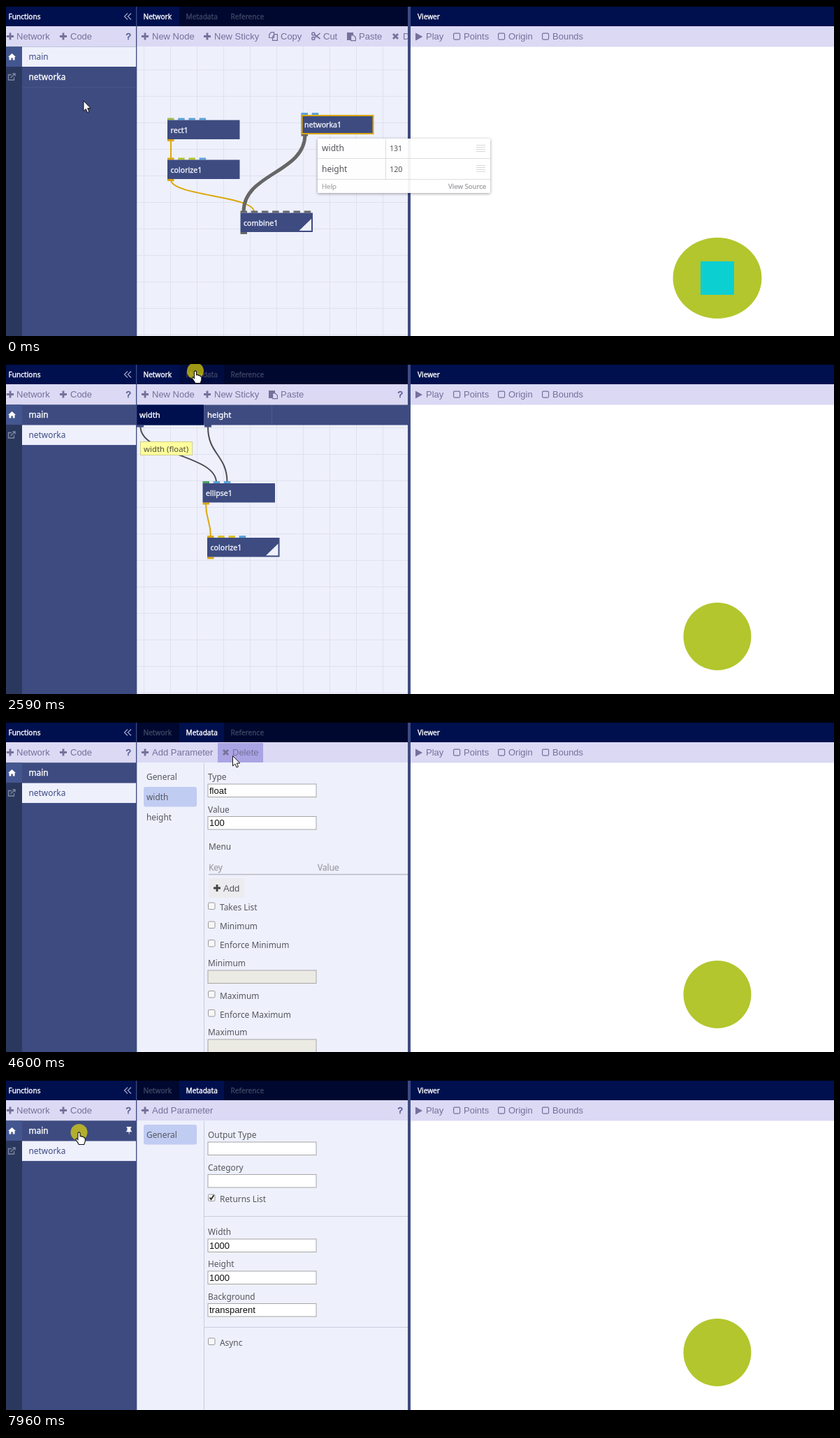
Animation, 1185 px wide and 473 px high, one loop 8 s. Source, as an HTML page:

```html
<!DOCTYPE html>
<html lang="en">
<head>
<meta charset="utf-8">
<title>Node editor</title>
<style>
html, body { margin: 0; width: 100%; height: 100%; overflow: hidden; background: #fff; }
svg { display: block; width: 1185px; height: 473px; }
text { font: 11.9px "Noto Sans", "Open Sans", sans-serif; fill: currentColor; white-space: pre; }
.m { stroke: currentColor; stroke-width: .35px; }
.a { font-family: "Liberation Sans", Arial, sans-serif; font-size: 13px; }
.off { display: none; }
</style>
</head>
<body>
<svg id="stage" viewBox="0 0 1185 473"></svg>
<script>
const NAVY = '#00104e', BLUE = '#3d4b80', INK = '#55565c', TOOL = '#74719a', PALE = '#eef0fc';
const ORANGE = '#dca70c', LIME = '#b7c52c', SKY = '#5ca3d8', GRAY = '#666';

// Drawing helpers
const rect = (x, y, w, h, fill, extra = '') =>
  `<rect x="${x}" y="${y}" width="${w}" height="${h}" fill="${fill}" ${extra}/>`;
const text = (x, y, s, color, cls = '', size = '') =>
  `<text x="${x}" y="${y}" class="${cls}" style="color:${color}${size && `;font-size:${size}px`}">${s}</text>`;
const path = (d, fill, stroke = 'none', w = 1, extra = '') =>
  `<path d="${d}" fill="${fill}" stroke="${stroke}" stroke-width="${w}" ${extra}/>`;
const at = (x, y, s) => `<g transform="translate(${x} ${y})">${s}</g>`;
// Content shown only while the pointer is inside the box
const zone = (x, y, w, h, hand, inner = '') =>
  `<g class="zone off" data-box="${x},${y},${w},${h}" data-hand="${hand}">${inner}</g>`;
const late = (time, inner) => `<g class="late off" data-from="${time}">${inner}</g>`;

const icons = {
  plus: c => path('M0 5H10M5 0V10', 'none', c, 2.8),
  cross: c => path('M1 1.5L8 8.5M8 1.5L1 8.5', 'none', c, 2.8),
  copy: c => path('M.6 4L3.6 .6H7.5V8.5H.6ZM5.5 7L8.5 3.6H12.4V12.4H5.5Z', '#dbd9f4', c, 1.2),
  cut: c => path('M4.5 4L12.5 10M4.5 8.5L12.5 2', 'none', c, 1.6) +
    `<g fill="none" stroke="${c}" stroke-width="1.5"><circle cx="2.8" cy="3" r="2"/><circle cx="2.8" cy="9.4" r="2"/></g>`,
  paste: c => rect(0, 1, 9, 11, c) + path('M5.6 5H9.5L12.4 8V12.6H5.6Z', '#dbd9f4', c, 1.2),
  play: c => path('M0 0L10 5.5L0 11Z', c),
  box: c => rect(.6, .6, 9, 9, 'none', `rx="1.5" stroke="${c}" stroke-width="1.2"`),
  pin: c => path('M1 0H8V1.3H7V5L9 7.3H5.2L4.6 12L4 7.3H0L2 5V1.3H1Z', c)
};
const tool = (x, icon, label, gap = 15) =>
  at(x, icon === 'cut' || icon === 'copy' || icon === 'paste' ? 37 : 38.5, icons[icon](TOOL)) +
  text(x + gap, 48, label, TOOL, 'a');
const help = x => text(x, 48, '?', '#566092', 'a', 13).replace('class="a"', 'class="a" font-weight="700" stroke="#566092" stroke-width=".6"');
const hot = (x, w) => zone(x, 30, w, 28, 0, rect(x, 30, w, 28, '#aaa4e4'));

function ports(x, y, colors) {
  return colors.map((c, i) => rect(x + i * 15.2, y - 3, 9.5, 3, c)).join('');
}
function node(x, y, name, inputs, out, { selected, output } = {}) {
  let s = ports(x, y, inputs) + rect(x, y + 27.5, 9.5, 3, out) + rect(x, y, 103.5, 27.5, BLUE);
  if (selected) s += rect(x + 1, y + 1, 102, 26, 'none', `stroke="${ORANGE}" stroke-width="2"`);
  if (output) s += path(`M${x + 84} ${y + 25.5}H${x + 101.5}V${y + 8.5}Z`, PALE);
  return s + text(x + 4.5, y + 18, name, '#f1f2fa', 'm', 10.6);
}
function wire(x1, y1, x2, y2, color, w = 2) {
  const mid = (y1 + y2) / 2;
  return path(`M${x1} ${y1}C${x1} ${mid} ${x2} ${mid} ${x2} ${y2}`, 'none', color, w);
}
function grid() {
  let d = '';
  for (let x = 197.5; x < 575; x += 38) d += `M${x} 58V473`;
  for (let y = 91.5; y < 473; y += 38) d += `M187 ${y}H575`;
  return rect(187, 58, 388, 415, PALE) + path(d, 'none', '#dfe3ee');
}

// Panels
function tabs(active) {
  const list = [['Network', 187, 61], ['Metadata', 248, 64], ['Reference', 312, 80]];
  return rect(187, 1, 388, 28, '#000830') + list.map(([name, x, w]) => {
    const on = name === active;
    return (on ? rect(x, 1, w, 28, NAVY) : zone(x, 1, w, 28, 1, rect(x, 1, w, 28, '#000c40'))) +
      text(x + 9.5, 18.5, name, on ? '#fff' : '#3f4562', 'm', 10.1);
  }).join('');
}
function rows(active) {
  return ['main', 'networka'].map((name, i) => {
    const y = 58.5 + i * 29, on = name === active;
    return rect(23, y, 163, 28.5, on ? PALE : BLUE) +
      text(32.5, y + 18.5, name, on ? BLUE : '#fff', on ? '' : 'm') +
      zone(23, y, 163, 29, 1, at(171.5, y + 8.5, icons.pin(on ? '#f7f8fe' : '#fff')));
  }).join('') + path('M23 116.5H186', 'none', '#465489');
}
const disc = '<circle cx="1018" cy="390.5" r="48.5" fill="#b3c62d"/>';

function popup() {
  const burger = y => path(`M673 ${y}h13m-13 3h13m-13 3h13m-13 3h13`, 'none', '#d8d8d8');
  return rect(446, 190, 247, 78, '#fff', 'opacity=".94" filter="url(#shadow)"') +
    path('M446 218.5H693M446 248.5H693M543.5 190V248', 'none', '#ddd') +
    text(452, 208, 'width', INK, '', 12.1) + text(549, 208, '131', INK, '', 10.6) +
    text(452, 237.5, 'height', INK, '', 12) + text(549, 237.5, '120', INK, '', 10.8) +
    burger(199.5) + burger(228.5) +
    text(452, 262, 'Help', '#b0b0b4', 'm', 9.6) + text(633, 262, 'View Source', '#a5a5aa', 'm', 9.6);
}
function mainView() {
  return rows('main') + tabs('Network') + grid() + hot(187, 89) +
    tool(194, 'plus', 'New Node') + tool(283, 'plus', 'New Sticky') + tool(376, 'copy', 'Copy', 17) +
    tool(437, 'cut', 'Cut', 17) + tool(488, 'paste', 'Paste', 17) + tool(553, 'cross', 'D') +
    wire(236, 193, 236, 219, ORANGE) + wire(236, 249, 355, 295, ORANGE) +
    wire(428, 184, 340, 295, GRAY, 5) +
    node(231, 163.5, 'rect1', ['#9dbb45', SKY, SKY, SKY], ORANGE) +
    node(231, 220.5, 'colorize1', [ORANGE, LIME, LIME, SKY], ORANGE) +
    node(335.5, 296.5, 'combine1', Array(7).fill(GRAY), GRAY, { output: true }) +
    node(422.5, 156, 'networka1', [SKY, SKY], GRAY, { selected: true }) +
    rect(575, 29, 4, 444, BLUE) + rect(579, 29, 8, 29, '#dbd9f4') + tool(586, 'play', '') +
    `<ellipse cx="1018" cy="390" rx="63.5" ry="58" fill="#b3c62d"/>` +
    rect(994, 366, 48, 48, '#0ccfd2') + popup();
}
function networkView() {
  return rows('networka') + tabs('Network') + grid() + hot(187, 89) +
    tool(194, 'plus', 'New Node') + tool(283, 'plus', 'New Sticky') +
    tool(376, 'paste', 'Paste', 17) + help(560.5) +
    rect(187, 58.5, 388, 29, BLUE) + path('M283.5 59V87M380.5 59V87', 'none', '#4b598e') +
    late(1720, rect(187, 58.5, 96, 29, NAVY)) + zone(187, 59, 194, 28, 1) +
    text(191, 76.5, 'width', '#fff', 'm', 11.3) + text(288, 76.5, 'height', '#fff', 'm', 11.3) +
    rect(187, 87, 10, 3.5, BLUE) + rect(284, 87, 10, 3.5, BLUE) +
    wire(192.5, 90, 301, 170, '#4d4d54') + wire(289, 90, 316.5, 170, '#4d4d54') +
    wire(286, 200, 293, 248, ORANGE) +
    node(281.5, 171, 'ellipse1', ['#4a9f60', SKY, SKY], ORANGE) +
    node(288, 249, 'colorize1', [ORANGE, '#d9c02a', '#d9c02a', SKY], ORANGE, { output: true }) +
    late(1800, rect(192.5, 111.5, 74, 19, '#ffff9c', 'stroke="#cfcf90"') +
      text(197, 125.5, 'width (float)', '#4c4c3c', '', 11.4)) + disc;
}

const input = (y, value = '', fill = '#fff') =>
  rect(289, y + .5, 155, 18.5, fill, 'stroke="#a6a6a6"') + text(291, y + 14, value, '#111', 'a');
const field = (y, label, value, fill) =>
  text(289, y + 4, label, INK) + input(y + 9.5, value, fill);
const check = (y, label, on) =>
  rect(289.5, y - 6.5, 9.5, 9.5, '#f8f8f8', 'rx="1.5" stroke="#999"') +
  (on ? path(`M291.5 ${y - 2}l2 2.5l4-6`, 'none', '#333', 2) : '') + text(306, y + 4.5, label, INK);

function metaFrame(items, chosen) {
  return rows('networka') + tabs('Metadata') + rect(187, 58, 388, 415, PALE) + hot(187, 116) +
    tool(194, 'plus', 'Add Parameter') + path('M283.5 59V473', 'none', '#c9cddc') +
    items.map((name, i) => {
      const y = 64 + i * 29;
      return (name === chosen ? rect(197, y, 76, 28.5, '#c1ccf3', 'rx="3"') : '') +
        zone(197, y, 76, 29, 1) + text(201, y + 18.5, name, INK);
    }).join('') + disc;
}
const general = params => metaFrame(['General', ...params], 'General') + help(560.5) +
  field(79, 'Output Type') + field(125.5, 'Category') + check(170.5, 'Returns List', true) +
  field(218, 'Width', '1000') + field(264, 'Height', '1000') + field(310.5, 'Background', 'transparent') +
  path('M284 195.5H575M284 354.5H575', 'none', '#c9cddc') + check(376.5, 'Async');

function param(params, chosen) {
  const flat = '#ebebe4';
  return metaFrame(['General', ...params], chosen) + hot(303, 65) + tool(310, 'cross', 'Delete', 14) +
    field(79, 'Type', 'float') + field(125.5, 'Value', '100') + text(290, 183, 'Menu', INK) +
    text(290, 212.5, 'Key', '#a2a3aa', 'm') + text(446, 212.5, 'Value', '#a2a3aa', 'm') +
    path('M290 218.5H575', 'none', '#b9bac2', 1.3) + rect(290, 224, 51, 28, '#ececef') +
    at(297, 233, icons.plus('#444')) + text(311, 243, 'Add', INK, 'a') +
    check(265.5, 'Takes List') + check(292.5, 'Minimum') + check(319, 'Enforce Minimum') +
    field(346, 'Minimum', '', flat) + check(392, 'Maximum') + check(419, 'Enforce Maximum') +
    field(445, 'Maximum', '', flat);
}

function chrome() {
  return rect(0, 0, 1185, 473, '#fff') + rect(0, 0, 1185, 29, NAVY) + rect(0, 29, 1185, 29.5, '#dbd9f4') +
    rect(0, 58.5, 187, 415, BLUE) + rect(0, 58.5, 23, 415, '#2b385d') + rect(0, 58.5, 23, 28.5, '#435690') +
    path('M3 73L8.5 68L14 73H12.5V77.5H9.8V74.5H7.3V77.5H4.5V73Z', '#fff') +
    path('M8 98.5H3.5V106H11.5V102M6.5 103L13 97M9.5 97H13V100.5', 'none', '#8189a3', 1.3) +
    text(3.5, 18.5, 'Functions', '#fff', 'm', 10.1) + text(589, 18.5, 'Viewer', '#fff', 'm', 10.1) +
    path('M174 10.5L169.5 15L174 19.5M179 10.5L174.5 15L179 19.5', 'none', '#98a1c8', 1.3) +
    tool(1, 'plus', 'Network', 14) + tool(77, 'plus', 'Code') + help(171.5) +
    tool(586, 'play', 'Play') + tool(640, 'box', 'Points') + tool(704, 'box', 'Origin') + tool(767, 'box', 'Bounds');
}
const frameLines = rect(0, 0, 1185, 1, '#000') + rect(186, 1, 1.3, 472, BLUE);

// Timeline, ms
const LOOP = 8000;
const scenes = [
  [0, mainView()], [950, networkView()], [2740, general(['width', 'height'])],
  [3820, param(['width', 'height'], 'width')], [4910, general(['height'])],
  [5930, param(['height'], 'height')], [6930, general([])]
];
// start, end, steps, way points
const moves = [
  [70, 320, 4, [[111, 136], [96, 106]]],
  [1270, 2030, 11, [[96, 106], [125, 135], [215, 74], [245, 50]]],
  [2110, 2340, 4, [[245, 50], [271, 10]]],
  [2970, 3590, 9, [[271, 10], [224, 104]]],
  [4130, 4600, 7, [[224, 104], [324.5, 48.5]]],
  [5160, 5620, 7, [[324.5, 48.5], [246, 97], [243, 106]]],
  [6240, 6620, 6, [[243, 106], [324.5, 48.5]]],
  [7250, 7700, 7, [[324.5, 48.5], [104.5, 75]]]
];
const clicks = [[790, 950], [2590, 2740], [3750, 3820], [4760, 4910], [5850, 5930], [6860, 6930], [7960, LOOP]];

const arrow = 'M0 0V14.5L3.3 11.5L5.6 16.6L8 15.5L5.7 10.6H10.2Z';
const hand = 'M-1.6 1Q0-1.2 1.6 1V5.8Q4-.0 4.5 6.6Q6.6 5.6 7 7.6Q8.7 7.6 8.8 9.3V13L7.2 17.5H-.2Q-1.8 14-4.6 10.8Q-4.6 8.4-3 9L-1.6 10.6Z'.replace('Q4-.0 ', 'Q4 5 ');

const stage = document.getElementById('stage');
stage.innerHTML = `<defs><filter id="shadow" x="-10%" y="-20%" width="120%" height="150%">
  <feDropShadow dx="0" dy="1" stdDeviation="2" flood-opacity=".4"/></filter></defs>` +
  chrome() + rect(575, 0, 4, 473, BLUE) +
  scenes.map(s => `<g class="scene off">${s[1]}</g>`).join('') + frameLines +
  rect(575, 1, 4, 57, BLUE) +
  `<g id="pointer"><circle id="click" r="12" fill="#f6e600" opacity=".64"/>` +
  path(arrow, '#fff', '#111', 1, 'id="arrow"') + path(hand, '#fff', '#111', 1.1, 'id="hand"') + '</g>';

const $ = id => document.getElementById(id);
const show = (el, on) => el.classList.toggle('off', !on);
const groups = [...stage.querySelectorAll('.scene')].map(el => ({
  el,
  late: [...el.querySelectorAll('.late')],
  zones: [...el.querySelectorAll('.zone')].map(z => ({
    el: z, box: z.dataset.box.split(',').map(Number), hand: z.dataset.hand === '1'
  }))
}));

function pointerAt(t) {
  const move = moves.filter(m => t >= m[0]).pop();
  if (!move) return moves[0][3][0];
  const [start, end, steps, pts] = move;
  const step = Math.min(steps, Math.floor((t - start) / (end - start) * (steps - 1) + 1e-6) + 1);
  const p = step / steps, u = p * p * (3 - 2 * p) * (pts.length - 1);
  const i = Math.min(pts.length - 2, Math.floor(u)), f = u - i;
  return pts[i].map((v, k) => v + (pts[i + 1][k] - v) * f);
}

function render(t) {
  const current = scenes.filter(s => t >= s[0]).length - 1;
  const [x, y] = pointerAt(t);
  let overLink = false;
  groups.forEach((g, i) => show(g.el, i === current));
  for (const z of groups[current].zones) {
    const [bx, by, w, h] = z.box;
    const inside = x >= bx && x < bx + w && y >= by && y < by + h;
    show(z.el, inside);
    if (inside && z.hand) overLink = true;
  }
  groups[current].late.forEach(el => show(el, t >= +el.dataset.from));
  $('pointer').setAttribute('transform', `translate(${x} ${y})`);
  show($('hand'), overLink);
  show($('arrow'), !overLink);
  show($('click'), clicks.some(([a, b]) => t >= a && t < b));
}

const begin = performance.now();
function tick() {
  render((performance.now() - begin) % LOOP);
  requestAnimationFrame(tick);
}
tick();
</script>
</body>
</html>
```
